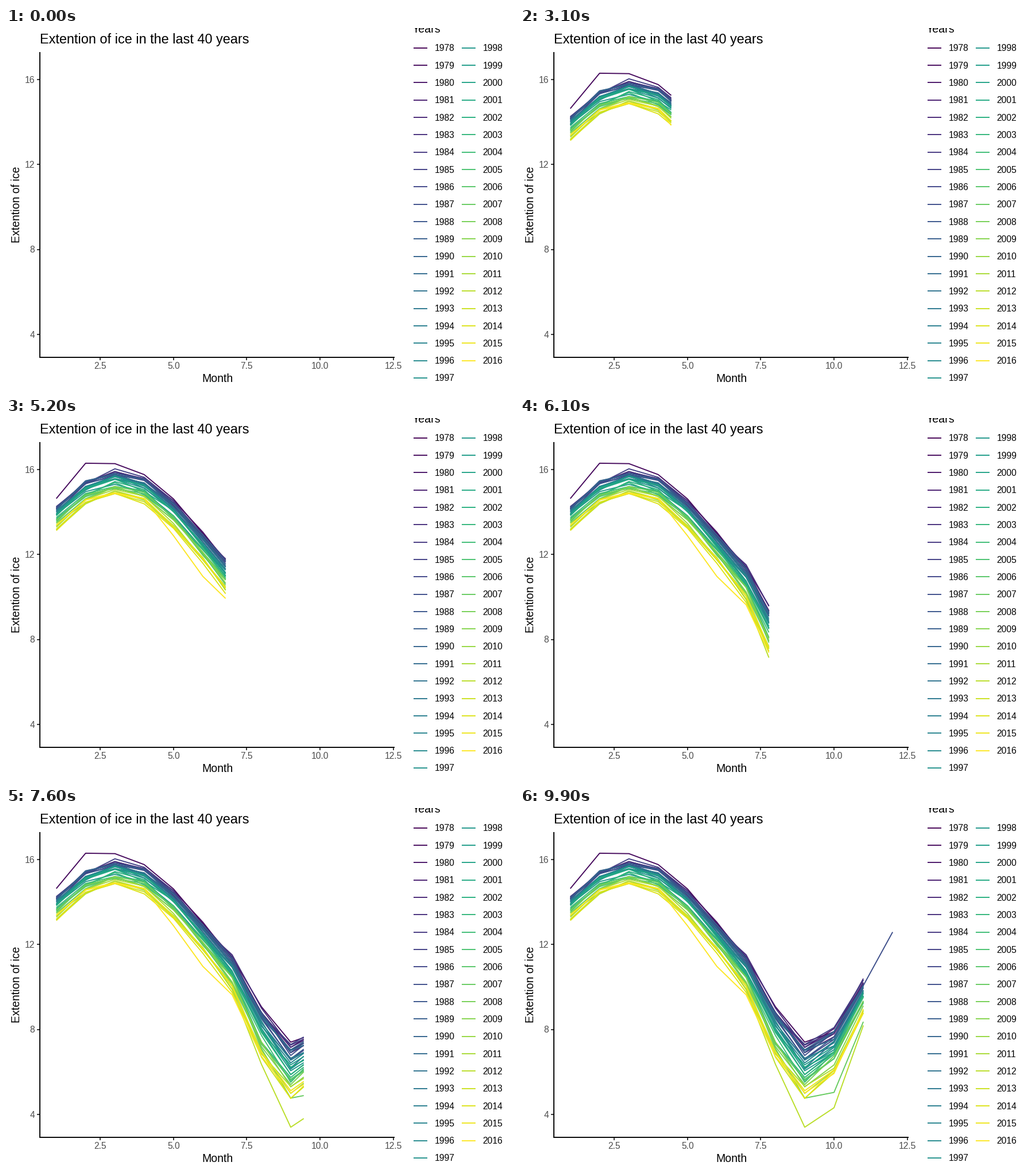
A matplotlib script that plays this animation: 885 by 632 pixels, repeating every 10000 ms.

```python
import numpy as np
import matplotlib as mpl
import matplotlib.pyplot as plt
from matplotlib.animation import FuncAnimation

W, H, DPI = 885, 632, 100
FRAMES, INTERVAL = 100, 100
PX = 72 / DPI          # points per pixel
BASE = 19.56           # base text size in pixels
SMALL = BASE * 0.8
LINE = 1.9 * PX

mpl.rcParams["font.family"] = "Liberation Sans"
mpl.rcParams["text.hinting"] = "force_autohint"

fig = plt.figure(figsize=(W / DPI, H / DPI), dpi=DPI, facecolor="white")
ax = fig.add_axes([0, 0, 1, 1])
ax.set_xlim(0, W)
ax.set_ylim(H, 0)
ax.axis("off")

YEARS = np.arange(1978, 2017)
COLORS = plt.get_cmap("viridis")(np.linspace(0, 1, len(YEARS)))


def px_x(month):
    return 164.2 + (np.asarray(month) - 2.5) * 51.05


def px_y(extent):
    return 90.2 + (16 - np.asarray(extent)) * 37.06


def label(x, y, text, size=SMALL, color="black", **kw):
    ax.text(x, y, text, fontsize=size * PX, color=color, va="baseline", **kw)


def stroke(xs, ys, color="black", **kw):
    return ax.plot(xs, ys, color=color, lw=LINE, solid_capstyle="butt",
                   solid_joinstyle="round", **kw)[0]


def draw_axes():
    left, right, top, bottom = 59.4, 677, 42, 574.6
    for v in range(4, 17, 4):
        y = px_y(v)
        stroke([left - 5, left], [y, y], "#333333")
        label(50.5, y + 5.6, str(v), color="#4D4D4D", ha="right")
    for v in np.arange(2.5, 13, 2.5):
        x = px_x(v)
        stroke([x, x], [bottom, bottom + 5], "#333333")
        label(x, 594.8, f"{v:.1f}", color="#4D4D4D", ha="center")
    stroke([left, left], [top, bottom + 0.9])
    stroke([left, right], [bottom, bottom])
    label(59, 27, "Extention of ice in the last 40 years", BASE * 1.2)
    label(368.2, 618, "Month", BASE, ha="center")
    label(24, 308, "Extention of ice", BASE, ha="center", rotation=90,
          rotation_mode="anchor")


def draw_legend():
    label(707.5, 7.5, "Years", BASE)
    for i, (year, color) in enumerate(zip(YEARS, COLORS)):
        col, row = divmod(i, 20)
        x, y = 710 + 83.6 * col, 34.8 + 30.32 * row
        stroke([x, x + 24.3], [y, y], color)
        label(x + 36.7, y + 5.6, str(year))


MONTHS = np.arange(1, 12)
# Typical seasonal curve at the start of the record, January to November
SEASON = [14.3, 15.5, 15.95, 15.6, 14.45, 12.95, 11.4, 8.95, 7.2, 8.0, 10.3]

# Exceptional years: centre month, size, width in months
EVENTS = {
    1979: (2.2, 0.65, 1.2),
    2007: (10, -1.6, 1.2),
    2012: (9.7, -1.9, 1.3),
    2016: (5.6, -0.9, 1.0),
}


def bump(center, size, width):
    return size * np.exp(-((MONTHS - center) / width) ** 2)


def make_series():
    rng = np.random.default_rng(40)
    summer = bump(8.9, 1, 1.9)
    loss = 1.1 + 1.4 * summer
    spread = 0.24 + 0.2 * summer
    series = []
    for year in YEARS[1:]:
        age = (year - 1979) / 37
        noise = 0.4 * rng.uniform(-1, 1) + 0.6 * rng.uniform(-1, 1, 11)
        values = SEASON - loss * age ** 1.3 + spread * noise
        if year in EVENTS:
            values += bump(*EVENTS[year])
        series.append((MONTHS, values))
    # Only 1987 has a reading for December
    values = series[1987 - 1979][1]
    series[1987 - 1979] = (np.arange(1, 13), np.append(values, 12.59))
    return series


draw_axes()
draw_legend()
SERIES = make_series()
lines = [stroke([], [], c, zorder=3) for c in COLORS[1:]]


def update(frame):
    now = 1 + 11 * frame / (FRAMES - 1)
    for line, (months, values) in zip(lines, SERIES):
        end = min(now, months[-1])
        past = months < end
        xs = np.append(months[past], end)
        ys = np.append(values[past], np.interp(end, months, values))
        line.set_data(px_x(xs), px_y(ys))
        line.set_visible(frame > 0)
    return lines


anim = FuncAnimation(fig, update, frames=FRAMES, interval=INTERVAL,
                     init_func=lambda: update(0), repeat=True,
                     repeat_delay=0, blit=False)
plt.show()
```
